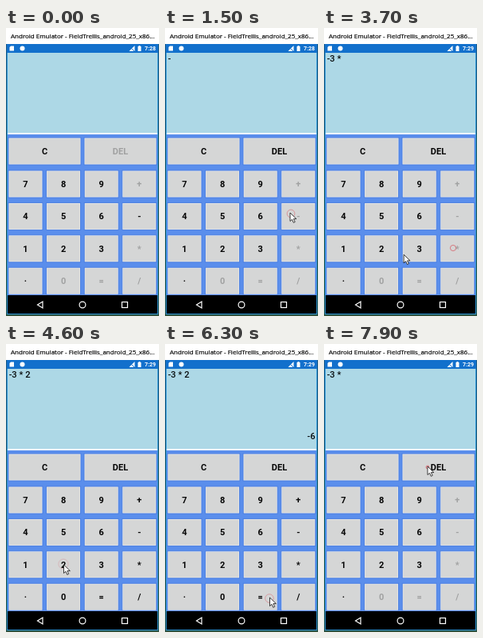
An HTML page for the animation above (8000 ms loop, 192x360 px).

```html
<!DOCTYPE html>
<html lang="en">
<head>
<meta charset="utf-8">
<title>Calculator</title>
<style>
  html, body { margin: 0; width: 100%; height: 100%; overflow: hidden; background: #24505c; }
  svg { display: block; width: 100vw; height: 100vh; }
  text { white-space: pre; }
  .title { font: 8px "Open Sans", sans-serif; fill: #000; stroke: #000; stroke-width: .2; }
  .clock { font: 700 7px Roboto, sans-serif; fill: #fff; text-anchor: end; }
  .key { font: 700 11px Roboto, sans-serif; fill: #050505; text-anchor: middle; }
  .key.off { fill: #a0a1a1; }
  .out { font: 500 11.2px Roboto, sans-serif; fill: #080c0e; }
</style>
</head>
<body>
<svg viewBox="0 0 192 360" preserveAspectRatio="none">
  <defs>
    <linearGradient id="desk" x2="0" y2="1">
      <stop offset="0" stop-color="#1d5f8c"/>
      <stop offset="1" stop-color="#2e5240"/>
    </linearGradient>
  </defs>
  <rect width="192" height="360" fill="url(#desk)"/>
  <rect x="1" y="20" width="190" height="338" fill="#2b93d6"/>
  <rect width="192" height="20" fill="#fff"/>
  <text class="title" x="6" y="13">Android Emulator - FieldTrellis_android_25_x86...</text>

  <rect x="1" y="20" width="190" height="11" fill="#1270cc"/>
  <path d="M6 22.500h4v6H4.500v-4.500z" fill="#fff"/>
  <circle cx="20.500" cy="25.500" r="3" fill="#fff"/>
  <path d="M154.500 29h7v-7z" fill="#fff"/>
  <path d="M155 23l6 6" stroke="#1270cc"/>
  <path d="M165.500 23h1v-1h2v1h1v6h-4z" fill="#fff"/>
  <text class="clock" id="clock" x="188" y="28">7:28</text>

  <rect x="2" y="31" width="188" height="303" fill="#5a8eec"/>
  <rect x="2" y="31" width="188" height="102" fill="#add8e6"/>
  <rect x="2" y="131" width="188" height="2" fill="#f8fcfd"/>
  <text class="out" id="expr" x="3.700" y="41.700"></text>
  <text class="out" id="result" x="188.500" y="119.200" text-anchor="end"></text>
  <g id="keys"></g>

  <rect x="2" y="334" width="188" height="23" fill="#000"/>
  <g fill="none" stroke="#fff" stroke-width="1.200">
    <path d="M46 342v8l-6.500-4z"/>
    <circle cx="96" cy="346" r="3.900"/>
    <rect x="145.500" y="342.500" width="7" height="7"/>
  </g>

  <circle id="ring" fill="none" stroke="#d85862" stroke-width=".9"/>
  <path id="cursor" d="M0 0v10.500l2.500-2.200 1.800 4 1.900-.9-1.800-3.800h3.500z"
        fill="#fff" stroke="#111" stroke-width=".8"/>
</svg>
<script>
const LOOP = 8000;
const RING_LIFE = 700;
const byId = id => document.getElementById(id);
const keys = {};

function set(node, attrs) {
  for (const name in attrs) node.setAttribute(name, attrs[name]);
  return node;
}

function add(tag, attrs) {
  const node = document.createElementNS('http://www.w3.org/2000/svg', tag);
  return byId('keys').appendChild(set(node, attrs));
}

function addKey(label, x, y, width, height) {
  add('rect', { x, y, width, height, fill: '#eeeeea', stroke: '#4a7ee2' });
  add('rect', { x: x + 1.2, y: y + 1.2, width: width - 2.4, height: height - 2.4,
    fill: '#d5d6d6' });
  keys[label] = add('text', { class: 'key', x: x + width / 2, y: y + height / 2 + 4 });
  keys[label].textContent = label;
}

addKey('C', 3, 137, 91, 34);
addKey('DEL', 98, 137, 91, 34);
['789+', '456-', '123*', '·0=/'].forEach((row, r) =>
  [...row].forEach((label, c) => addKey(label, 3 + c * 47.6, 178 + r * 40.4, 43, 34)));

// time, expression, result
const states = [
  [0, '', ''],
  [1200, '-', ''],
  [2500, '-3', ''],
  [3500, '-3 *', ''],
  [4150, '-3 * 2', ''],
  [5950, '-3 * 2', '-6'],
  [7850, '-3 *', '']
];

// time, x, y
const clicks = [
  [1050, 158, 232],
  [2400, 131, 269],
  [3400, 162, 275],
  [4000, 72, 275],
  [5800, 131, 318],
  [7800, 130, 154]
];

// time, x, y
const path = [
  [600, 194, 262], [1000, 157, 231], [1600, 157, 231],
  [2250, 131, 268], [2500, 131, 268],
  [3030, 162, 275], [3450, 162, 275],
  [3850, 72, 287], [3950, 72.5, 276], [5000, 72.5, 276],
  [5700, 131.5, 317], [6500, 131.5, 317],
  [7400, 130, 153], [LOOP, 130, 153]
];

function cursorAt(t) {
  const i = path.findIndex(p => p[0] > t);
  const [t0, x0, y0] = path[i - 1], [t1, x1, y1] = path[i];
  const p = (t - t0) / (t1 - t0), e = p * p * (3 - 2 * p);
  return [x0 + (x1 - x0) * e, y0 + (y1 - y0) * e];
}

function showState(t) {
  const [, expr, result] = states.filter(s => s[0] <= t).pop();
  const complete = /\d$/.test(expr);
  byId('expr').textContent = expr;
  byId('result').textContent = result;
  byId('clock').textContent = t < 2000 ? '7:28' : '7:29';
  for (const label of '+-*/0=') {
    const on = complete || (label === '-' && !expr);
    keys[label].classList.toggle('off', !on);
  }
  keys.DEL.classList.toggle('off', !expr);
}

function showRing(t) {
  const click = clicks.find(([start]) => t >= start && t < start + RING_LIFE);
  if (!click) return set(byId('ring'), { opacity: 0 });
  const [start, cx, cy] = click;
  const p = (t - start) / RING_LIFE;
  set(byId('ring'), { cx, cy, r: 1 + 6 * p, opacity: 1 - p * p });
}

function draw(t) {
  showState(t);
  showRing(t);
  const visible = t >= path[0][0];
  set(byId('cursor'), { visibility: visible ? 'visible' : 'hidden' });
  if (visible) set(byId('cursor'), { transform: `translate(${cursorAt(t)})` });
}

const begin = performance.now();
function tick() {
  draw((performance.now() - begin) % LOOP);
  requestAnimationFrame(tick);
}
tick();
</script>
</body>
</html>
```
